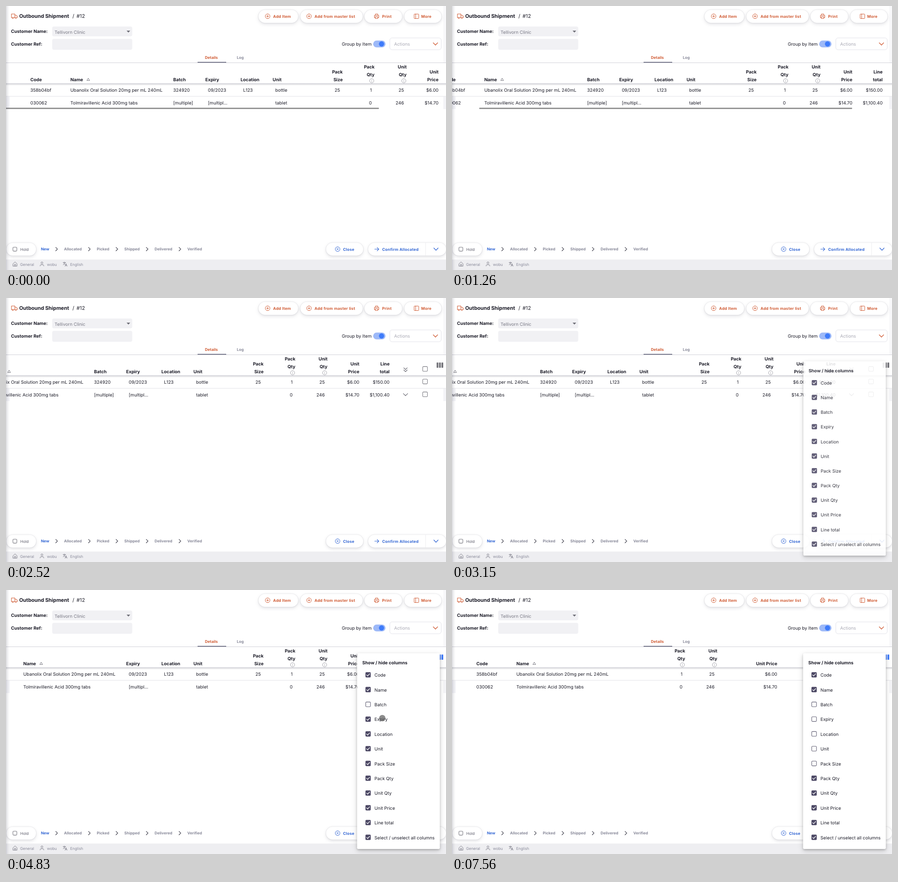
Animation of 967x579 px, one loop 8000 ms. Source, as an HTML page:

```html
<!DOCTYPE html>
<html lang="en">
<head>
<meta charset="utf-8">
<title>Outbound Shipment</title>
<style>
html, body { margin: 0; width: 100%; height: 100%; overflow: hidden; background: #fff; }
svg { display: block; width: 100%; height: 100%; }
text { font-family: Inter, "Liberation Sans", sans-serif; font-size: 9.8px; fill: #1c1c28; text-rendering: geometricPrecision; white-space: pre; }
.b { font-weight: 700; }
.title { font-size: 11.2px; }
.small { font-size: 8.4px; }
.btn { font-size: 8.55px; font-weight: 700; letter-spacing: .028em; }
.line { fill: none; stroke-linecap: round; stroke-linejoin: round; }
.pill { fill: #fff; filter: drop-shadow(0 .5px 1px rgba(96,97,112,.25)) drop-shadow(0 3px 3.5px rgba(40,41,61,.13)); }
.paper { fill: #fff; filter: drop-shadow(0 2px 2px rgba(0,0,0,.2)) drop-shadow(0 4px 6px rgba(0,0,0,.17)); }
</style>
</head>
<body>
<svg viewBox="0 0 967 579" xmlns="http://www.w3.org/2000/svg">
  <defs>
    <linearGradient id="edge"><stop offset="0" stop-color="#28293d" stop-opacity=".17"/><stop offset=".45" stop-color="#28293d" stop-opacity=".06"/><stop offset="1" stop-color="#28293d" stop-opacity="0"/></linearGradient>
    <linearGradient id="under" x2="0" y2="1"><stop offset="0" stop-color="#28293d" stop-opacity=".16"/><stop offset="1" stop-color="#28293d" stop-opacity="0"/></linearGradient>
  </defs>
  <g id="page"></g>
  <g id="table"></g>
  <rect id="bar" y="223" height="3" rx="1" fill="#959595"/>
  <rect width="8" height="579" fill="url(#edge)"/>
  <g id="menu"></g>
  <circle id="dot" r="7" fill="#555" fill-opacity=".68"/>
</svg>
<script>
const W = 967, LOOP = 8000, STEP = 70;
const ORANGE = '#d05c35', BLUE = '#3568d4', BRIGHT = '#3e7bfa', GRAY = '#8a8b9b', DARK = '#1c1c28', INK = '#4d4965';
const $ = id => document.getElementById(id);

const text = (x, y, s, cls = '', fill = DARK, anchor = 'start') =>
  `<text x="${x}" y="${y}" class="${cls}" style="fill:${fill}" text-anchor="${anchor}">${s}</text>`;
const rect = (x, y, w, h, r, fill, more = '') =>
  `<rect x="${x}" y="${y}" width="${w}" height="${h}" rx="${r}" fill="${fill}" ${more}/>`;
const path = (d, color, w = 1) => `<path class="line" d="${d}" stroke="${color}" stroke-width="${w}"/>`;
const ring = (x, y, r, color, w = 1) => `<circle cx="${x}" cy="${y}" r="${r}" fill="none" stroke="${color}" stroke-width="${w}"/>`;
const pill = (x, y, w, h) => `<rect class="pill" x="${x}" y="${y}" width="${w}" height="${h}" rx="${h / 2}"/>`;
const down = (x, y, w, h, color, lw = 1.2) => path(`M${x - w / 2} ${y - h / 2}l${w / 2} ${h}l${w / 2} ${-h}`, color, lw);
const emptyBox = (x, y, size = 10.4, color = '#77777f') =>
  rect(x - size / 2, y - size / 2, size, size, 1.8, 'none', `stroke="${color}" stroke-width="1.1"`);
const fullBox = (x, y) => rect(x - 5.8, y - 5.8, 11.6, 11.6, 1.8, INK) +
  path(`M${x - 3.3} ${y + .2}l2.3 2.4l4.4 -4.8`, '#fff', 1.3);

function drawPage() {
  const plus = x => ring(x, 22.5, 5.1, ORANGE) + path(`M${x - 2.3} 22.5h4.6M${x} 20.2v4.6`, ORANGE);
  const buttons = [[555, 87, 587, 'Add Item'], [647, 137, 678, 'Add from master list'],
    [788, 82.5, 826.5, 'Print'], [875.5, 81.5, 912.5, 'More']];
  const stages = [[127.5, 'Allocated'], [199.5, 'Picked'], [260, 'Shipped'], [326.5, 'Delivered'], [398.5, 'Verified']];

  let s = rect(961, 0, 6, 124, 0, '#f8f8fa') + rect(961, 199, 6, 27, 0, '#f4f4f7') + rect(0, 199, 8, 27, 0, '#f3f3f7');

  // heading
  s += path('M12 17.5h7.5v8h-1.6M14 25.5h-2v-8M17.9 25.5h-1.8M19.5 20.3h3l2.2 2.4v2.8h-1.2M19.5 25.5v-5', ORANGE, 1.1);
  s += ring(15, 26.3, 1.4, ORANGE) + ring(21.6, 26.3, 1.4, ORANGE);
  s += text(29, 26, 'Outbound Shipment', 'b title') + text(146, 26, '/', 'title') + text(155, 26, '#12', 'title');
  for (const [x, w, tx, label] of buttons) s += pill(x, 8.5, w, 28.5) + text(tx, 25.7, label, 'btn', ORANGE);
  s += plus(575) + plus(666);
  s += path('M811.8 20.6v-3h5.4v3M811.8 25.4h-2.1v-4.8h9.6v4.8h-2.1M811.8 23.6h5.4v3.8h-5.4z', ORANGE);
  s += rect(897, 17.7, 10, 9.8, 1, 'none', `stroke="${ORANGE}"`) + path('M900.3 17.7v9.8', ORANGE);

  // customer fields
  s += text(11, 59.4, 'Customer Name:', 'b') + text(11, 87.4, 'Customer Ref:', 'b');
  s += rect(101.5, 45, 176, 21.5, 4, '#f1f1f4') + rect(101.5, 72, 176, 24, 4, '#f1f1f4');
  s += text(106.8, 60.6, 'Tellivorn Clinic', '', '#777783') + '<path d="M265 54h8l-4 4.2z" fill="#707078"/>';

  s += text(738, 87, 'Group by Item') + rect(807, 75.7, 27, 15, 7.5, '#9db9f8') + `<circle cx="825.3" cy="83.2" r="5.7" fill="${BRIGHT}"/>`;
  s += rect(843.5, 70, 113, 26, 5, '#fff', 'stroke="#e2e2e9"') + text(853, 87, 'Actions', '', '#a9a9b4');
  s += down(943.8, 83.3, 9.6, 5, ORANGE, 1.3);

  // tabs
  s += text(437.3, 116.4, 'Details', 'b small', ORANGE) + text(507.3, 116.4, 'Log', 'b small', GRAY);
  s += rect(0, 124, W, 1, 0, '#cfcfd6') + rect(421, 122.7, 63, 1.5, 0, '#555770');

  // status bar
  s += pill(1, 519.5, 65, 28) + emptyBox(19.5, 533.3, 8.6) + text(31.6, 536.7, 'Hold', 'small', '#5d5d6b');
  s += text(76.7, 536.2, 'New', 'b small', BLUE);
  for (const [x, label] of stages) s += text(x, 536.2, label, 'b small', GRAY);
  for (const x of [109.3, 181.3, 241.8, 308.3, 380.3]) s += path(`M${x} 529.4l3.8 3.8l-3.8 3.8`, '#3b3b48', 1.2);
  s += pill(703.5, 519.3, 81.5, 28.2) + ring(728.8, 533.3, 5.1, BLUE) + path('M726.9 531.4l3.8 3.8M730.7 531.4l-3.8 3.8', BLUE);
  s += text(740.7, 536.6, 'Close', 'btn', BLUE);
  s += pill(796, 519.3, 171, 28.2) + path('M810.3 533.3h9M815.6 529.6l3.8 3.7l-3.8 3.7', BLUE, 1.1);
  s += text(826.8, 536.6, 'Confirm Allocated', 'btn', BLUE) + rect(921.7, 519.3, .8, 28.2, 0, '#e6e6ec') + down(945, 533.3, 9.4, 5, BLUE, 1.3);

  // footer
  s += rect(0, 556, W, 23, 0, '#eeeef1');
  s += path('M15.6 565.2l4.3 -4l4.3 4v5.4h-8.6zM18.6 570.6v-4h2.6v4', '#777783', .9);
  s += ring(79, 563.4, 2.1, '#777783', .9) + path('M75 570.3v-.8q0 -2 2 -2h4q2 0 2 2v.8', '#777783', .9);
  s += path('M125.3 562.6h6M128.3 561.4v1.2M130.3 562.6q-1.2 3.5 -4.6 5M126.8 563.8q1 2 3 3.2M129.8 570.8l2.2 -5.6l2.2 5.6M130.6 569h2.8', '#777783', .9);
  s += text(31, 569.9, 'General', 'small', GRAY) + text(90, 569.9, 'wobu', 'small', GRAY) + text(141, 569.9, 'English', 'small', GRAY);
  return s;
}

// name, width, cells, kind: l = left, i = left with indented cells, q = quantity, m = money
const COLS = [
  ['Code', 88, ['358b04bf', '030062'], 'l'],
  ['Name', 226, ['Ubanolix Oral Solution 20mg per mL 240mL', 'Tolmiravillenic Acid 300mg tabs'], 'l'],
  ['Batch', 70.5, ['324920', '[multiple]'], 'l'],
  ['Expiry', 77.5, ['09/2023', '[multipl...'], 'i'],
  ['Location', 70.5, ['L123', ''], 'i'],
  ['Unit', 94.5, ['bottle', 'tablet'], 'i'],
  ['Pack Size', 70.5, ['25', ''], 'q'],
  ['Pack Qty', 70, ['1', '0'], 'q'],
  ['Unit Qty', 70.5, ['25', '246'], 'q'],
  ['Unit Price', 70, ['$6.00', '$14.70'], 'm'],
  ['Line total', 66.5, ['$150.00', '$1,100.40'], 'm'],
];
const FULL = 1141, PAD = 5.5, ROWS = [187.5, 215.6];
const FIRST_HIDDEN = 2;
// time each further column is switched off, and how much the Name column then grows
const HIDES = [[4480, 0], [5110, 0], [5880, 0], [6790, 55], [7560, 86]];
const TAPS = [[2450, 940.5, 124], [4130, 828, 251], [4830, 827, 281], [5670, 839, 322.5]];

function headCell(name, x, right, width) {
  if (!right) return text(x, 164.7, name, 'b');
  if (name === 'Unit Price' && width > 105) return text(x, 164.7, name, 'b', DARK, 'end');
  const [a, b] = name.split(' '), qty = b === 'Qty';
  let s = text(x, qty ? 136.7 : 148.3, a, 'b', DARK, 'end') + text(x, qty ? 153.6 : 164.7, b, 'b', DARK, 'end');
  if (qty) s += ring(x - 6.2, 164, 4.6, '#8f8f98', .8) + path(`M${x - 6.2} 163.6v2.4M${x - 6.2} 161.8v.1`, '#8f8f98', .8);
  return s;
}

function drawTable(hidden, scroll, iconColor) {
  const shown = COLS.filter((c, i) => i < FIRST_HIDDEN || i >= FIRST_HIDDEN + hidden);
  const natural = FULL - COLS.slice(FIRST_HIDDEN, FIRST_HIDDEN + hidden).reduce((n, c) => n + c[1], 0);
  const total = Math.max(W, natural);
  const grow = hidden ? HIDES[hidden - 1][1] : 0;
  const share = (total - natural - grow) / 2;
  const left = -Math.min(scroll, total - W);

  let s = rect(0, 169.6, W, 1.2, 0, '#cdcdd4') + rect(0, 170.8, W, 4, 0, 'url(#under)') + rect(0, 197.6, W, 1, 0, '#e0e0e5');
  let x = left + 48;
  for (const [name, base, cells, kind] of shown) {
    const right = kind === 'q' || kind === 'm';
    const width = base + (name === 'Name' ? grow : kind === 'm' ? share : 0);
    const hx = right ? x + width - PAD : x + PAD;
    const cx = hx + (kind === 'i' ? 5.8 : kind === 'q' ? -6 : 0);
    s += headCell(name, hx, right, width);
    cells.forEach((c, i) => s += text(cx, ROWS[i], c, '', DARK, right ? 'end' : 'start'));
    if (name === 'Name') s += path(`M${hx + 36.6} 163.4h5.8l-2.9 -4.8z`, '#555560', .8);
    x += width;
  }
  const end = left + total, ex = end - 89;
  s += down(ex, 155, 7.6, 3.8, '#55555f', 1.1) + down(ex, 159.8, 7.6, 3.8, '#55555f', 1.1) + down(ex, 212, 9.4, 4.8, '#66666f');
  for (const y of [155.6, 183.2, 211.3]) s += emptyBox(end - 46, y);
  for (let i = 0; i < 3; i++) s += rect(end - 20.6 + i * 5.3, 141.5, 3.9, 11.6, .8, iconColor);
  return s;
}

function drawMenu(hidden) {
  let s = '<rect class="paper" x="771.5" y="138.5" width="182" height="429.5" rx="3"/>' + text(783, 162.8, 'Show / hide columns', 'b');
  [...COLS.map(c => c[0]), 'Select / unselect all columns'].forEach((name, i) => {
    const y = 186 + i * 32.4, off = i >= FIRST_HIDDEN && i < FIRST_HIDDEN + hidden;
    s += (off ? emptyBox(795.8, y, 10.4, '#5f5d72') : fullBox(795.8, y)) + text(809.8, y + 4.2, name);
  });
  return s;
}

const clamp = v => Math.min(1, Math.max(0, v));
const smooth = p => p * p * (3 - 2 * p);
const easeOut = p => 1 - (1 - p) ** 3;
// share of an n-step change that begins at a given time
const progress = (t, start, n) => clamp((t - start + STEP) / (n * STEP));

function render(t) {
  const scroll = 174 * smooth(progress(t, 1050, 7) ** 1.48);
  const hidden = HIDES.filter(h => t >= h[0]).length;
  $('table').innerHTML = drawTable(hidden, scroll, t >= 4480 ? BRIGHT : '#74747a');

  const bar = $('bar'), ratio = W / FULL;
  bar.setAttribute('x', scroll * ratio);
  bar.setAttribute('width', W * ratio);
  bar.setAttribute('opacity', 1 - progress(t, 1890, 4));

  const open = progress(t, 3010, 6), size = easeOut(clamp(open / .667)), menu = $('menu');
  menu.innerHTML = open ? drawMenu(hidden) : '';
  menu.setAttribute('opacity', easeOut(open));
  menu.setAttribute('transform', `translate(944 147) scale(${.75 + .25 * size} ${.5625 + .4375 * size}) translate(-944 -147)`);

  const tap = TAPS.find(p => t >= p[0] && t < p[0] + STEP), dot = $('dot');
  dot.setAttribute('visibility', tap ? 'visible' : 'hidden');
  if (tap) {
    dot.setAttribute('cx', tap[1]);
    dot.setAttribute('cy', tap[2]);
  }
}

$('page').innerHTML = drawPage();
const start = performance.now();
let last = -1;
function tick() {
  const t = Math.floor(((performance.now() - start) % LOOP) / STEP) * STEP;
  if (t !== last) render(last = t);
  requestAnimationFrame(tick);
}
tick();
</script>
</body>
</html>
```
